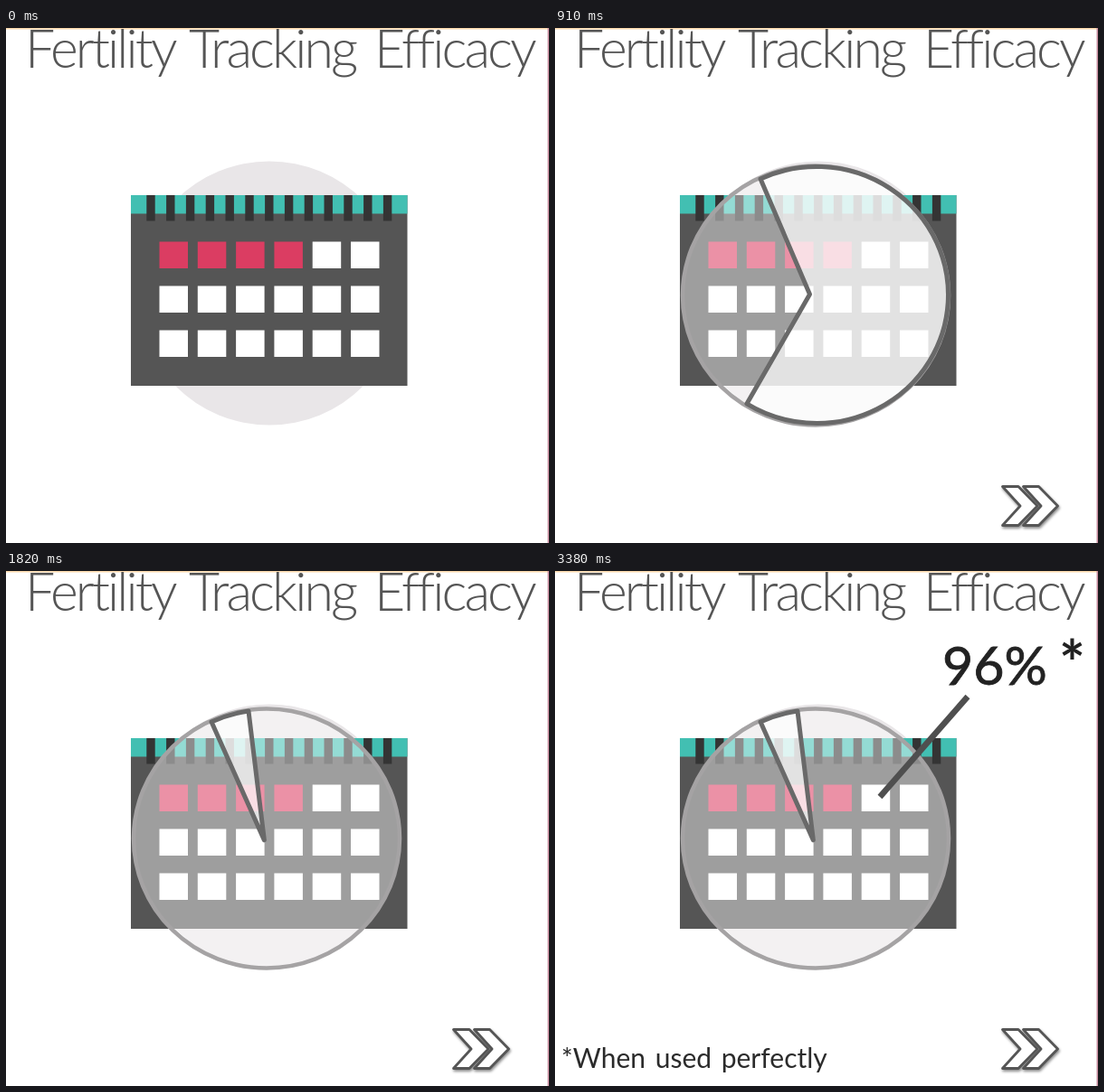
Write an HTML page that moves like this. It is 600 by 570 pixels and loops after 7020 ms.

```html
<!DOCTYPE html>
<html lang="en">
<head>
<meta charset="utf-8">
<title>Fertility Tracking Efficacy</title>
<style>
  html, body { margin: 0; width: 100%; height: 100%; overflow: hidden; background: #fff; }
  svg { display: block; width: 600px; height: 570px; font-family: Lato, "Open Sans", sans-serif; }
  .title { font-size: 59px; font-weight: 300; letter-spacing: -2.9px; fill: #555; }
  .value { font-size: 59px; fill: #222; stroke: #222; stroke-width: .8px; }
  .star { font-size: 68px; font-weight: 700; fill: #222; }
  .note { font-size: 30px; word-spacing: 3px; fill: #2b2b2b; }
</style>
</head>
<body>
<svg viewBox="0 0 600 570">
  <rect width="600" height="570" fill="#fff"/>
  <rect width="600" height="1.5" fill="#fbd9ad"/>
  <rect x="598.5" width="1.5" height="570" fill="#c68a9c"/>
  <g class="title">
    <text x="21" y="44">Fertility</text>
    <text x="202" y="44">Tracking</text>
    <text x="407" y="44">Efficacy</text>
  </g>
  <circle cx="291" cy="293.5" r="146" fill="#e9e6e8"/>
  <rect x="138" y="185" width="305.5" height="211" fill="#555"/>
  <rect x="138" y="185" width="305.5" height="20.5" fill="#42bfb2"/>
  <g id="tabs" fill="#343434"></g>
  <g id="cells"></g>
  <g id="pie">
    <ellipse id="disc" fill="#fff" fill-opacity=".43" stroke="#a5a3a4" stroke-width="4.5"/>
    <path id="sector" fill="#fff" fill-opacity=".7" stroke="#696969" stroke-width="5" stroke-linejoin="round"/>
  </g>
  <path id="pointer" stroke="#4f4f4f" stroke-width="6.5" fill="none"/>
  <text id="value" class="value" x="428" y="126">96%</text>
  <text id="star" class="star" x="557" y="127">*</text>
  <text id="note" class="note" x="7" y="550">*When used perfectly</text>
  <g id="arrows" fill="#fff" stroke="#555" stroke-width="2.8" stroke-linejoin="round"
     style="filter: drop-shadow(1.5px 2px 1.5px rgba(0,0,0,.45))">
    <path d="M494.5 507.5H512L533 529 512 550.5H494.5L514 529Z"/>
    <path d="M517.5 507.5H534.5L555.5 529 534.5 550.5H517.5L537 529Z"/>
  </g>
</svg>
<script>
const LOOP = 7020, STEP = 130;
const START_ANGLE = -25.2;
// One entry per step; the last entry holds.
const arrowScale = [0, 0.6, 1.22, 1.06, 0.97, 1];
const endAngle = [328, 328, 328, 328, 310, 280, 247, 212, 168, 123, 80, 43, 14, -4, -8.3];

const $ = id => document.getElementById(id);
const at = (table, i) => table[Math.min(i, table.length - 1)];
const show = (id, on) => $(id).style.visibility = on ? 'visible' : 'hidden';

function set(el, attrs) {
  for (const key in attrs) el.setAttribute(key, attrs[key]);
}
function addRect(parent, attrs) {
  const rect = document.createElementNS('http://www.w3.org/2000/svg', 'rect');
  set(rect, attrs);
  $(parent).append(rect);
}

for (let i = 0; i < 13; i++)
  addRect('tabs', { x: 155.3 + 21.8 * i, y: 185, width: 9.4, height: 28.5 });
for (let row = 0; row < 3; row++)
  for (let col = 0; col < 6; col++)
    addRect('cells', {
      x: 169.5 + 42.3 * col, y: 236.5 + 49 * row, width: 31.5, height: 29.5,
      fill: row === 0 && col < 4 ? '#db3d62' : '#fff'
    });

function onEllipse(cx, cy, rx, ry, deg) {
  const a = deg * Math.PI / 180;
  return `${cx + rx * Math.sin(a)} ${cy - ry * Math.cos(a)}`;
}

function drawPie(scale, end) {
  const x = 281.2 + 5.8 * scale, y = 290.2 + 5.8 * scale;
  set($('disc'), { cx: x + scale, cy: y, rx: 147 * scale, ry: 143.5 * scale });

  const rim = [x + 2 * scale, y - 0.5 * scale, 145.5 * scale, 142 * scale];
  // The tip sits slightly behind the hub, opposite the middle of the sector.
  const back = (START_ANGLE + end) / 2 + 180;
  const tip = onEllipse(x - 2.5 * scale, y - scale, 3 * scale, 3 * scale, back);
  const large = end - START_ANGLE > 180 ? 1 : 0;
  set($('sector'), {
    d: `M${tip}L${onEllipse(...rim, START_ANGLE)}` +
       `A${rim[2]} ${rim[3]} 0 ${large} 1 ${onEllipse(...rim, end)}Z`
  });
}

function render(time) {
  const step = Math.floor(time % LOOP / STEP);

  const s = at(arrowScale, step);
  show('arrows', step >= 1);
  set($('arrows'), { transform: `translate(525 529) scale(${s}) translate(-525 -529)` });

  show('pie', step >= 3);
  drawPie(Math.max(0.08, Math.min(1, 0.08 + 0.23 * (step - 3))), at(endAngle, step));

  const reach = Math.max(0, Math.min(1, (step - 14) / 3));
  show('pointer', reach > 0);
  set($('pointer'), { d: `M359 250l${97 * reach} ${-111 * reach}` });

  show('value', step >= 18);
  show('star', step >= 22);
  show('note', step >= 26);
}

const begin = performance.now();
function tick() {
  render(performance.now() - begin);
  requestAnimationFrame(tick);
}
tick();
</script>
</body>
</html>
```
